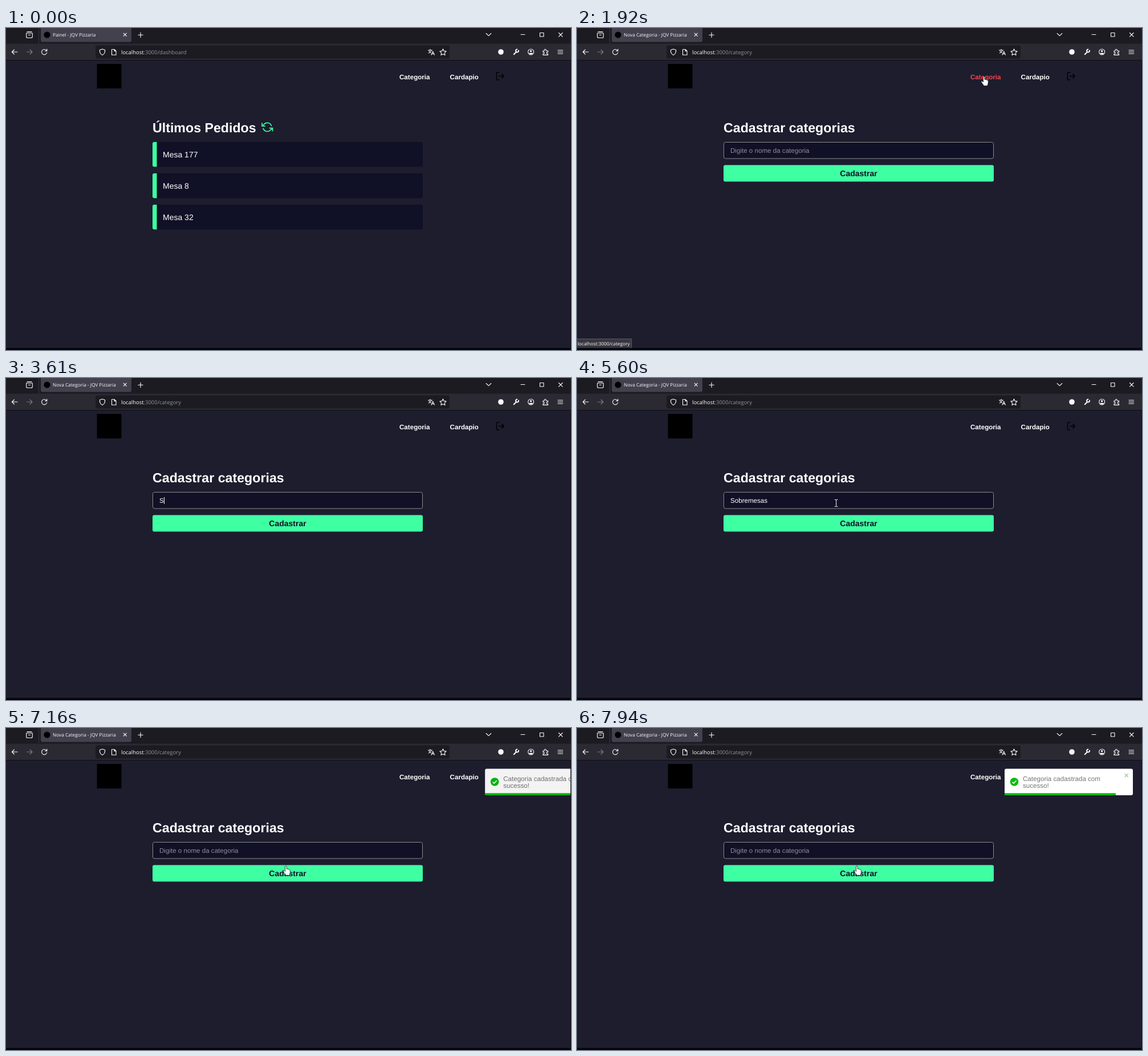
Recreate the animation shown at these times as an HTML page. Size 991 by 565 pixels, loop 8000 ms.

```html
<!DOCTYPE html>
<html lang="pt-BR">
<head>
<meta charset="utf-8">
<title>Painel</title>
<style>
  html, body { margin: 0; width: 100%; height: 100%; overflow: hidden; background: #1d1d2e; }
  svg { display: block; }
  text { font-family: "Liberation Sans", Arial, sans-serif; font-size: 11.6px; fill: #fff; text-rendering: geometricPrecision; white-space: pre; }
  .ui { font-family: "Open Sans", "Noto Sans", sans-serif; font-size: 8.25px; fill: #fbfbfe; }
  .url { font-size: 9.45px; }
  .bold { font-weight: 700; }
  .title { font-size: 23.2px; font-weight: 700; }
  .item { font-size: 14px; }
  .line { fill: none; stroke: #fbfbfe; stroke-width: 1.1; stroke-linecap: round; stroke-linejoin: round; }
  .feather { fill: none; stroke-width: 2; stroke-linecap: round; stroke-linejoin: round; }
</style>
</head>
<body>
<svg width="991" height="565" viewBox="0 0 991 565">
  <rect width="991" height="565" fill="#1d1d2e"/>

  <!-- browser chrome -->
  <rect width="991" height="28" fill="#1c1b22"/>
  <rect y="27.5" width="991" height="28.5" fill="#2b2a33"/>
  <rect y="56" width="991" height="1" fill="#0e0e14"/>
  <rect x="57" width="1" height="27" fill="#38373f"/>
  <rect x="61" y="-4" width="159" height="28.5" rx="3" fill="#42414d"/>
  <rect x="157" y="30.5" width="621" height="23" rx="3" fill="#1c1b22"/>
  <g id="titlebar">
    <circle cx="72" cy="12" r="5.6"/>
    <text id="tab" class="ui" x="82" y="15"></text>
    <path class="line" d="M37 6.6h8M35.7 9h10.6v6.2a2 2 0 0 1-2 2h-6.6a2 2 0 0 1-2-2zM39.4 12.2h3.2M206.2 9.2l5 5m0-5l-5 5M236 8v8.4M231.8 12.2h8.4M842.2 9.5l4.3 4.2 4.3-4.2M903 11.5h7M936.5 8.5h6.5v6.5h-6.5zM969.5 8.5l6.6 6.6m0-6.6l-6.6 6.6"/>
  </g>
  <text class="ui url" x="202" y="46">localhost<tspan id="path" fill="#93929c"></tspan></text>
  <g class="line">
    <path d="M20 42H10.4M14.4 38l-4 4 4 4"/>
    <path d="M36.4 42H46M42 38l4 4-4 4" opacity=".4"/>
    <path d="M71 39.6A4.6 4.6 0 1 0 71.7 43M71.8 37v3.3h-3.3"/>
    <path d="M169 37l4.6 1.6c.3 4-1.4 7.2-4.6 9c-3.2-1.8-4.9-5-4.6-9z"/>
    <path d="M185.5 37.5h4.5l3 3v6.7h-7.5zM190 37.5v3h3"/>
    <path d="M740.5 39h7M744 37.3V39M741.3 44c2.7-1.2 4.3-2.8 4.8-5M742 40.2c.8 1.6 1.8 2.5 3 3.2M746 47.3l2.7-6.3 2.7 6.3M747 45.4h3.4"/>
    <path d="M766.5 36.8l1.7 3.6 3.9.5-2.8 2.8.7 3.9-3.5-1.9-3.5 1.9.7-3.9-2.8-2.8 3.9-.5z"/>
    <path d="M890.8 46.2l4-4M899 39.4A2.5 2.5 0 1 1 896.4 37.4" stroke-width="2"/>
    <circle cx="920.7" cy="42" r="5"/>
    <path d="M918 44.4h5.4a3 2.4 0 0 1-5.4 0zM919.6 40.5a1.1 1.1 0 1 1 2.2 0a1.1 1.1 0 1 1-2.2 0z" fill="#fbfbfe"/>
    <path d="M942 40h2.3v-1.3a1.5 1.5 0 0 1 3 0V40h3.2v2.4h-1a1.4 1.4 0 0 0 0 2.8h1v2.2H942v-2.2h.7a1.4 1.4 0 0 0 0-2.8H942z"/>
    <path d="M968 39h8.6M968 42h8.6M968 45h8.6"/>
  </g>
  <circle cx="868" cy="42" r="4.8" fill="#fbfbfe"/>

  <!-- page header -->
  <rect x="159.5" y="63" width="43" height="43"/>
  <text id="link" class="bold" x="690" y="90">Categoria</text>
  <text class="bold" x="778.6" y="90">Cardapio</text>
  <g class="feather" stroke="#000" transform="translate(858.2 75.8) scale(.725)">
    <path d="M9 21H5a2 2 0 0 1-2-2V5a2 2 0 0 1 2-2h4M16 17l5-5-5-5M21 12H9"/>
  </g>

  <g id="orders">
    <text class="title" x="257" y="183">Últimos Pedidos</text>
    <g class="feather" stroke="#3fffa3" transform="translate(448.2 163.8) scale(.84)">
      <path d="M1 4v6h6M23 20v-6h-6M20.49 9A9 9 0 0 0 5.64 5.64L1 10m22 4l-4.64 4.36A9 9 0 0 1 3.51 15"/>
    </g>
  </g>

  <g id="form">
    <text class="title" x="257" y="183">Cadastrar categorias</text>
    <rect x="257.5" y="200.5" width="473" height="28.5" rx="3" fill="#101026" stroke="#8a8a8a"/>
    <text id="field" x="269" y="219"></text>
    <rect id="caret" y="209" width="1" height="12" fill="#fff"/>
    <rect x="257" y="240.5" width="474" height="29" rx="3" fill="#3fffa3"/>
    <text class="bold item" x="494" y="260" text-anchor="middle" style="fill:#101026">Cadastrar</text>
  </g>

  <g id="status">
    <rect x="-1" y="545.5" width="96.5" height="17" fill="#38373f" stroke="#5b5a66"/>
    <text class="ui" x="1" y="557">localhost:3000/category</text>
  </g>

  <g id="toast">
    <rect x="750" y="71.5" width="225" height="46.5" rx="3" fill="#fff"/>
    <circle cx="767" cy="94.5" r="7.3" fill="#07bc0c"/>
    <path d="M763.6 94.7l2.4 2.5 4.5-5" fill="none" stroke="#fff" stroke-width="1.6"/>
    <text x="782" y="92.6" style="fill:#757575">Categoria cadastrada com</text>
    <text x="782" y="105.2" style="fill:#757575">sucesso!</text>
    <path d="M960.8 80.3l6 6m0-6l-6 6" stroke="#9ccf9c" stroke-width="1.4"/>
    <rect id="bar" x="750" y="114.3" width="225" height="3.7" fill="#07bc0c"/>
  </g>

  <rect y="561.5" width="991" height="4" fill="#050509"/>
  <rect x="990" y="57" width="1" height="508" fill="#0c0c14"/>

  <g id="mouse">
    <path id="arrow" d="M0 0v13.5l3.2-3 2.1 5 2-.9-2-4.8h4.3z" fill="#fff" stroke="#000" stroke-width=".7"/>
    <path id="beam" d="M-2.8-6h2.1L0-5.5.7-6h2.1M0-5.5v11M-2.8 6h2.1L0 5.5.7 6h2.1" fill="none" stroke="#fff"/>
    <path id="hand" d="M-1.4 1.2C-1.4-.5 1.2-.5 1.2 1.2V5.4C2.2 4.7 3.3 5 3.5 5.9 4.4 5.4 5.4 5.8 5.6 6.6 6.6 6.2 7.4 6.9 7.4 8V11.5C7.4 13.3 6.4 14.4 6.2 16.4H-.4C-.7 14.6-2.5 13.2-4.6 9.8-5.4 8.3-4 7.4-2.8 8.4L-1.4 9.8z" fill="#fff" stroke="#000" stroke-width=".7"/>
  </g>
</svg>

<script>
const LOOP = 8000;
const $ = id => document.getElementById(id);
const show = (id, on) => $(id).style.visibility = on ? 'visible' : 'hidden';

for (const [i, name] of ['Mesa 177', 'Mesa 8', 'Mesa 32'].entries()) {
  const y = 200 + i * 55;
  $('orders').insertAdjacentHTML('beforeend',
    `<rect x="257" y="${y}" width="474" height="43.5" rx="3" fill="#101026"/>
     <path d="M264.5 ${y}v43.5h-4.5a3 3 0 0 1-3-3v-37.5a3 3 0 0 1 3-3z" fill="#3fffa3"/>
     <text class="item" x="275" y="${y + 27}">${name}</text>`);
}

// Tracks are scrubbed by the shared clock; each step is [ms, styles].
const tracks = [];
function track(id, steps, easing = 'linear') {
  const frames = steps.map(([ms, style]) => ({ offset: ms / LOOP, easing, ...style }));
  frames.unshift({ ...frames[0], offset: 0, easing: 'linear' });
  frames.push({ ...frames.at(-1), offset: 1 });
  const animation = $(id).animate(frames, { duration: LOOP, fill: 'both' });
  animation.pause();
  tracks.push(animation);
}

const fill = color => ({ fill: color });
const fade = opacity => ({ opacity });
const slide = (x, opacity = 1) => ({ transform: `translate(${x}px, 0px)`, opacity });

track('link', [[1150, fill('#fff')], [1500, fill('#ff3f4b')], [2060, fill('#ff3f4b')], [2430, fill('#fff')]]);
track('status', [[1219, fade(0)], [1300, fade(1)], [2500, fade(1)], [2740, fade(0)]]);
track('titlebar', [[69, fade(1)], [70, fade(.8)], [1639, fade(.8)], [1640, fade(1)]]);
track('toast', [[6885, slide(2175, 0)], [7305, slide(-18)], [7410, slide(7)], [7515, slide(-3.6)], [7585, slide(0)]],
  'cubic-bezier(.215,.61,.355,1)');
track('bar', [[7540, { width: '225px' }], [8000, { width: '190.5px' }]]);

const mousePath = [
  [410, 914, 519], [550, 880, 462], [690, 848, 370], [830, 808, 262], [970, 772, 182], [1080, 742, 130],
  [1150, 714, 85], [1920, 714, 85], [2060, 690, 100], [2200, 570, 165], [2390, 459, 215],
  [5599, 455, 219], [5600, 455, 219], [5740, 405, 285], [5950, 297, 433], [6150, 430, 305],
  [6300, 490, 242], [6890, 490, 242], [7090, 491, 242]
];
function mouseAt(t) {
  const next = mousePath.findIndex(p => p[0] > t);
  if (next < 1) return mousePath.at(next).slice(1);
  const [a, b] = [mousePath[next - 1], mousePath[next]];
  const k = (t - a[0]) / (b[0] - a[0]);
  return [a[1] + (b[1] - a[1]) * k, a[2] + (b[2] - a[2]) * k];
}

const word = 'Sobremesas';
const keyTimes = [3610, 4010, 4210, 4340, 4470, 4600, 4740, 4870, 5010, 5140];
const OPEN = 1850, FOCUS = 3150, SENT = 6760;

function drawForm(t) {
  const typed = t < SENT ? word.slice(0, keyTimes.filter(k => k <= t).length) : '';
  const field = $('field');
  field.textContent = typed || 'Digite o nome da categoria';
  field.style.fill = typed ? '#fff' : '#8e8e9b';
  const blinkOff = t >= 5340 && Math.floor((t - 5340) / 535) % 2 === 0;
  show('caret', t >= FOCUS && t < SENT && !blinkOff);
  $('caret').setAttribute('x', typed ? Math.round(269 + field.getComputedTextLength()) : 269);
}

function drawMouse(t) {
  const [x, y] = mouseAt(t);
  const over = (left, top, right, bottom) => x >= left && x <= right && y >= top && y <= bottom;
  const form = t >= OPEN;
  const visible = t >= 410 && (t < 3610 || t >= 5600);
  const hand = over(688, 82, 746, 94) || form && over(257, 240, 731, 270);
  const beam = form && over(257, 200, 731, 229);
  $('mouse').setAttribute('transform', `translate(${x} ${y})`);
  show('hand', visible && hand);
  show('beam', visible && beam);
  show('arrow', visible && !hand && !beam);
}

function draw(t) {
  const form = t >= OPEN;
  show('orders', !form);
  show('form', form);
  $('tab').textContent = (form ? 'Nova Categoria' : 'Painel') + ' - JQV Pizzaria';
  $('path').textContent = form ? ':3000/category' : ':3000/dashboard';
  $('path').style.fill = '#93929c';
  drawForm(t);
  if (!form) show('caret', false);
  drawMouse(t);
  for (const animation of tracks) animation.currentTime = t;
}

const start = performance.now();
function tick() {
  draw((performance.now() - start) % LOOP);
  requestAnimationFrame(tick);
}
tick();
</script>
</body>
</html>
```
